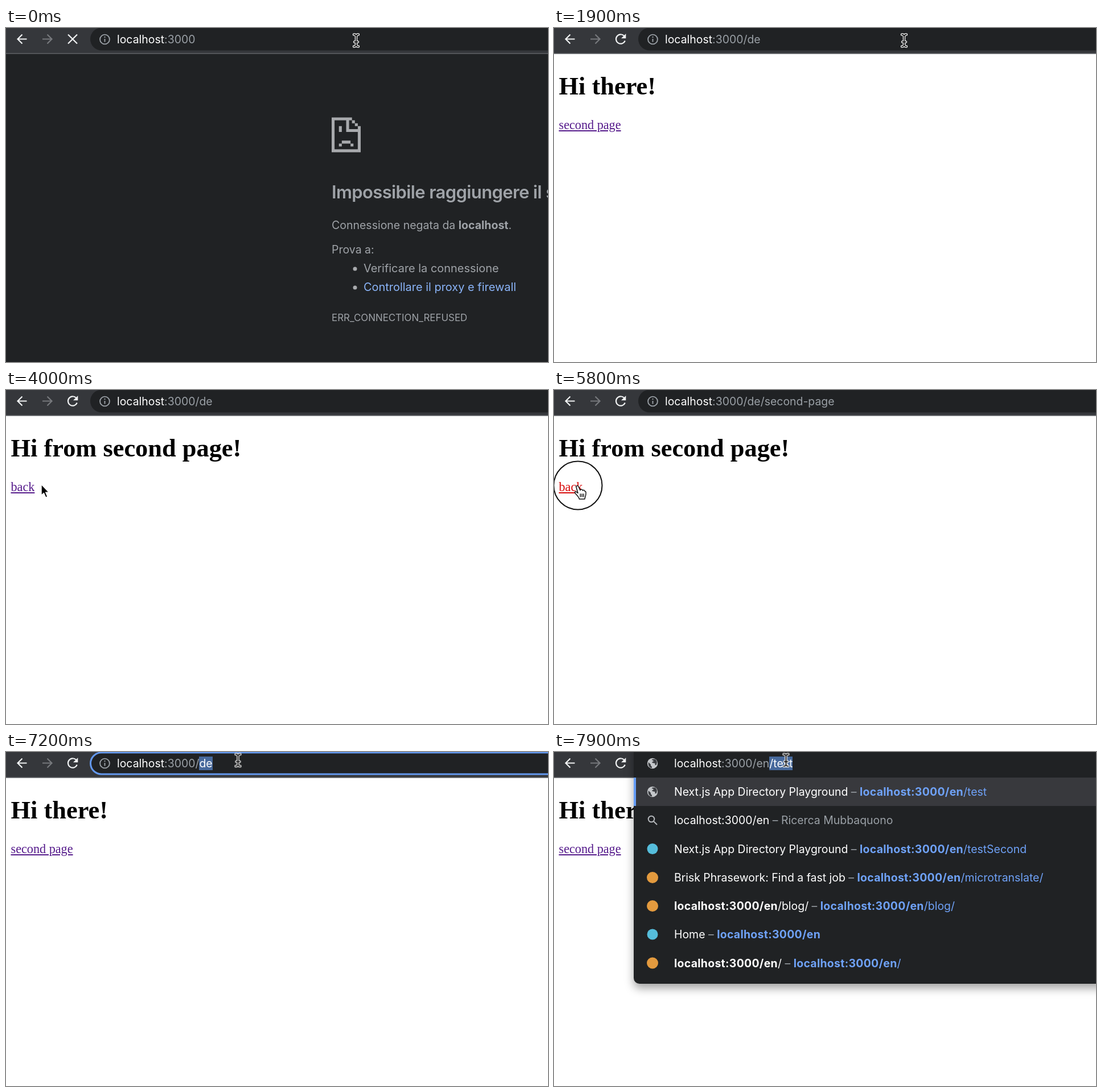
These frames come from a looping animation (952 by 588 pixels, 8000 ms). An HTML page:

```html
<!DOCTYPE html>
<html lang="it">
<head>
<meta charset="utf-8">
<title>Localhost navigation</title>
<style>
html, body { margin: 0; width: 100%; height: 100%; overflow: hidden; background: #fff; }
#stage { position: relative; width: 952px; height: 588px; overflow: hidden; background: #fff;
  font: 19.45px/40px Inter, Roboto, sans-serif; white-space: pre; }
.layer, .line, .panel { position: absolute; }
.layer { left: 0; top: 0; width: 952px; height: 588px; }
/* --y is the vertical centre of the line */
.line { left: var(--x); top: calc(var(--y) * 1px - 20px); }

.error { background: #202224; color: #9fa3a8; font-size: 19.5px; }
.error .title { font-size: 31px; font-weight: 600; letter-spacing: -.02em; }
.error .item { --x: 628px; font-size: 19.95px; }
.error .code { font-size: 16.9px; }
.error .link { color: #8ab4f8; }
.page { --x: 8.5px; font-family: "Liberation Serif", "Noto Serif", serif; color: #000; }
.page .title { font-size: 44.4px; font-weight: 700; }
.page .link { font-size: 22.2px; color: #551a8b; text-decoration: underline; }

.url { --x: 195px; --y: 20; color: #9aa0a6; }
.url i { font-style: normal; color: #fff; }
.selected { background: #47699c; color: #fff; }
.panel { left: 140px; top: -20px; width: 840px; height: 427.5px; border-radius: 10px;
  background: #202224; box-shadow: 0 8px 16px rgba(0,0,0,.36); }
.panel .url { --x: 71px; --y: 40; }
.active { position: absolute; left: 0; top: 65px; width: 836px; height: 50px;
  background: #38393d; border-left: 4px solid #669df6; }
.row { --x: 71px; color: #fff; }
.row b { letter-spacing: .015em; }
.row u { text-decoration: none; color: #6fa2f8; }
.row s { text-decoration: none; color: #9aa0a6; }
.panel svg { position: absolute; left: 0; top: 0; }

.error, .home, .second, .stop, .reload, .root, .de, .deep, .ring, .panel, .e, .en,
.beam, .arrow, .hand, .click, .pill, .page .link, .word, .cursor {
  animation: 8s step-end infinite; }
.error, .root { animation-name: before-load; }
.home { animation-name: home; }
.second { animation-name: second; }
.stop { animation-name: stop; }
.reload { animation-name: reload; }
.de { animation-name: de; }
.deep { animation-name: deep; }
.ring { animation-name: ring; }
.panel { animation-name: panel; }
.e { animation-name: e; }
.en { animation-name: en; }
.beam { animation-name: beam; }
.arrow { animation-name: arrow; }
.hand { animation-name: hand; }
.click { animation-name: click; }
.pill { animation-name: hover; }
.page .link { animation-name: press; }
.word { animation-name: select; }
.cursor { animation-name: move; }

@keyframes before-load { 0% { opacity: 1 } 7.5%, 100% { opacity: 0 } }
@keyframes home { 0%, 46.25% { opacity: 0 } 7.5%, 76.25%, 100% { opacity: 1 } }
@keyframes second { 0%, 76.25%, 100% { opacity: 0 } 46.25% { opacity: 1 } }
@keyframes stop { 0% { opacity: 1 } 13.75%, 100% { opacity: 0 } }
@keyframes reload { 0% { opacity: 0 } 13.75%, 100% { opacity: 1 } }
@keyframes de { 0%, 51.25%, 95%, 100% { opacity: 0 } 7.5%, 80% { opacity: 1 } }
@keyframes deep { 0%, 80%, 100% { opacity: 0 } 51.25% { opacity: 1 } }
@keyframes ring { 0%, 95%, 100% { opacity: 0 } 85% { opacity: 1 } }
@keyframes panel { 0% { opacity: 0 } 95%, 100% { opacity: 1 } }
@keyframes e { 0% { opacity: 1 } 96.25%, 100% { opacity: 0 } }
@keyframes en { 0% { opacity: 0 } 96.25%, 100% { opacity: 1 } }
@keyframes beam { 0%, 80%, 100% { opacity: 1 } 36.25% { opacity: 0 } }
@keyframes arrow { 0%, 42.5%, 62.5%, 80%, 100% { opacity: 0 } 36.25%, 46.25%, 76.25% { opacity: 1 } }
@keyframes hand { 0%, 46.25%, 76.25%, 100% { opacity: 0 } 42.5%, 62.5% { opacity: 1 } }
@keyframes click { 0%, 45%, 75%, 86.25%, 100% { opacity: 0 } 42.5%, 72.5%, 83.75% { opacity: 1 } }
@keyframes hover { 0%, 37.5%, 100% { fill: #202224 } 32.5% { fill: #282b2e } }
@keyframes press { 0%, 45%, 75%, 100% { color: #551a8b } 42.5%, 72.5% { color: #d80a0a } }
@keyframes select { 0% { background: none; color: #9aa0a6 } 88.75%, 100% { background: #47699c; color: #fff } }
@keyframes move {
  0% { transform: translate(615px, 22px) }
  31.25% { transform: translate(613px, 22px) }
  32.5% { transform: translate(608px, 22px) }
  33.75% { transform: translate(596px, 23px) }
  35% { transform: translate(579px, 25px) }
  36.25% { transform: translate(547px, 37px) }
  37.5% { transform: translate(460px, 68px) }
  38.75% { transform: translate(310px, 108px) }
  40% { transform: translate(165px, 136px) }
  41.25% { transform: translate(86px, 149px) }
  42.5% { transform: translate(84px, 168px) }
  47.5% { transform: translate(76px, 167px) }
  48.75% { transform: translate(67px, 166px) }
  50% { transform: translate(62px, 166px) }
  61.25% { transform: translate(60px, 166px) }
  62.5% { transform: translate(50px, 167px) }
  63.75% { transform: translate(42px, 168px) }
  65% { transform: translate(34px, 168px) }
  66.25% { transform: translate(33px, 168px) }
  67.5% { transform: translate(38px, 168px) }
  68.75% { transform: translate(42px, 168px) }
  76.25% { transform: translate(60px, 150px) }
  77.5% { transform: translate(120px, 110px) }
  78.75% { transform: translate(205px, 68px) }
  80% { transform: translate(285px, 34px) }
  81.25% { transform: translate(335px, 20px) }
  82.5% { transform: translate(354px, 17px) }
  87.5% { transform: translate(372px, 16px) }
  88.75% { transform: translate(395px, 15px) }
  90%, 100% { transform: translate(407.5px, 14.5px) }
}
</style>
</head>
<body>
<div id="stage">
  <div class="layer page home">
    <div class="line title" style="--y:102">Hi there!</div>
    <div class="line link" style="--y:171">second page</div>
  </div>
  <div class="layer page second">
    <div class="line title" style="--y:102">Hi from second page!</div>
    <div class="line link" style="--y:171">back</div>
  </div>
  <div class="layer error" style="--x:572px">
    <svg class="layer" width="952" height="588" fill="#a8aaad">
      <path transform="translate(572 157.5) scale(5.1)" fill-rule="evenodd" d="M0 0H7V1H6V4H9V3H10V12H0ZM1 1V11H9V5H5V1ZM7 1h1v1h-1zM8 2h1v1h-1zM2.5 3h1v2h-1zM3.5 8h3v1h-3zM2.5 9h1v1h-1zM6.5 9h1v1h-1z"/>
      <circle cx="613" cy="424" r="3.5"/>
      <circle cx="613" cy="457" r="3.5"/>
    </svg>
    <div class="line title" style="--y:289">Impossibile raggiungere il sito</div>
    <div class="line" style="--y:346.5">Connessione negata da <b>localhost</b>.</div>
    <div class="line" style="--y:390">Prova a:</div>
    <div class="line item" style="--y:422.5">Verificare la connessione</div>
    <div class="line item link" style="--y:455.5">Controllare il proxy e firewall</div>
    <div class="line code" style="--y:510">ERR_CONNECTION_REFUSED</div>
  </div>

  <svg class="layer" width="952" height="588" fill="none" stroke-width="2.2">
    <path fill="#35373b" d="M0 0H952V45H0Z"/>
    <path fill="#595b5f" d="M0 44H952V45.7H0Z"/>
    <rect class="pill" x="148" y="-.5" width="900" height="40" rx="20" fill="#202224"/>
    <rect class="ring" x="148.5" y="1" width="900" height="38" rx="19" stroke="#6398ee" stroke-width="3"/>
    <path stroke="#f1f3f4" d="M36.5 19.5H20.5M28.5 11.5l-8 8 8 8"/>
    <path stroke="#77797d" d="M64 19.5H80.5M72.5 11.5l8 8-8 8"/>
    <path class="stop" stroke="#f1f3f4" d="M109 11.5l16 16m0-16l-16 16"/>
    <g class="reload">
      <path stroke="#f1f3f4" d="M124.8 22.5A8.2 8.2 0 1 1 123 13.7"/>
      <path fill="#f1f3f4" d="M126.3 10v8.3H118z"/>
    </g>
    <g stroke="#9aa0a6" stroke-width="1.9">
      <circle cx="173.5" cy="20" r="8.4"/>
      <path d="M173.5 15v2.1M173.5 18.9v5.6"/>
    </g>
  </svg>
  <div class="line url root"><i>localhost</i>:3000</div>
  <div class="line url de"><i>localhost</i>:3000/<span class="word">de</span></div>
  <div class="line url deep"><i>localhost</i>:3000/de/second-page</div>

  <div class="panel">
    <div class="active"></div>
    <svg width="60" height="427">
      <defs>
        <g id="globe">
          <circle r="9.2" fill="#c4c7ca"/>
          <path fill="#3b3d41" d="M-7-2l4 4v2l2 2v2.5C-6 8-8.5 2-7-2ZM0-7.5h4.5c4 3 4 7 2 10.5l-2 0v-3l-5-1v-2h2v-2l-3-1z"/>
        </g>
      </defs>
      <use href="#globe" x="33" y="40"/>
      <use href="#globe" x="33" y="90"/>
      <g fill="none" stroke="#b4b7bb" stroke-width="2">
        <circle cx="31" cy="138" r="5.3"/>
        <path d="M35 142l6 6"/>
      </g>
      <g fill="#55bddb"><circle cx="33" cy="190.5" r="9.5"/><circle cx="33" cy="341" r="9.5"/></g>
      <g fill="#e39a3e"><circle cx="33" cy="241" r="10"/><circle cx="33" cy="291" r="10"/><circle cx="33" cy="391.5" r="10"/></g>
    </svg>
    <div class="line url e"><i>localhost</i>:3000/e<span class="selected">n/test</span></div>
    <div class="line url en"><i>localhost</i>:3000/en<span class="selected">/test</span></div>
    <div class="line row" style="--y:90">Next.js App Directory Playground<s> – </s><u><b>localhost:3000/en</b>/test</u></div>
    <div class="line row" style="--y:140">localhost:3000/en<s> – Ricerca Mubbaquono</s></div>
    <div class="line row" style="--y:190.5">Next.js App Directory Playground<s> – </s><u><b>localhost:3000/en</b>/testSecond</u></div>
    <div class="line row" style="--y:241">Brisk Phrasework: Find a fast job<s> – </s><u><b>localhost:3000/en</b>/microtranslate/</u></div>
    <div class="line row" style="--y:291"><b>localhost:3000/en</b>/blog/<s> – </s><u><b>localhost:3000/en</b>/blog/</u></div>
    <div class="line row" style="--y:341">Home<s> – </s><u><b>localhost:3000/en</b></u></div>
    <div class="line row" style="--y:391.5"><b>localhost:3000/en</b>/<s> – </s><u><b>localhost:3000/en</b>/</u></div>
  </div>

  <svg class="layer" width="952" height="588">
    <defs>
      <path id="bar" d="M-4-10.5Q0-10.5 0-7V7Q0 10.5-4 10.5M4-10.5Q0-10.5 0-7M0 7Q0 10.5 4 10.5M-3 2.5H3"/>
    </defs>
    <g class="cursor" stroke-linejoin="round">
      <circle class="click" r="42.5" fill="none" stroke="#111" stroke-width="2"/>
      <g class="beam" fill="none" stroke-linecap="round">
        <use href="#bar" stroke="#fff" stroke-width="4.4"/>
        <use href="#bar" stroke="#111" stroke-width="1.8"/>
      </g>
      <path class="arrow" fill="#000" stroke="#fff" stroke-width="1.5" d="M0 0V19.5L4.4 15.5 7.8 23.3 11 22 7.7 14.2H13.5Z"/>
      <g class="hand" stroke="#111" stroke-width="1.5" stroke-linecap="round">
        <path fill="#fff" d="M-3 3C-3.5 0 0 0 1 2L4 8.5C5 6.5 8 6.5 8.5 9C10 7.5 12 8.5 12.2 10.5C14 10 14.3 12 14 14.5C14 18 12.5 20 12 24H2.5C1.5 20-2 17-5 13.5C-6.5 11.5-4 10-2 12L0 13.5Z"/>
        <path fill="none" d="M4.3 15v5M7.2 15v5M10 15v5"/>
      </g>
    </g>
  </svg>
</div>
</body>
</html>
```
